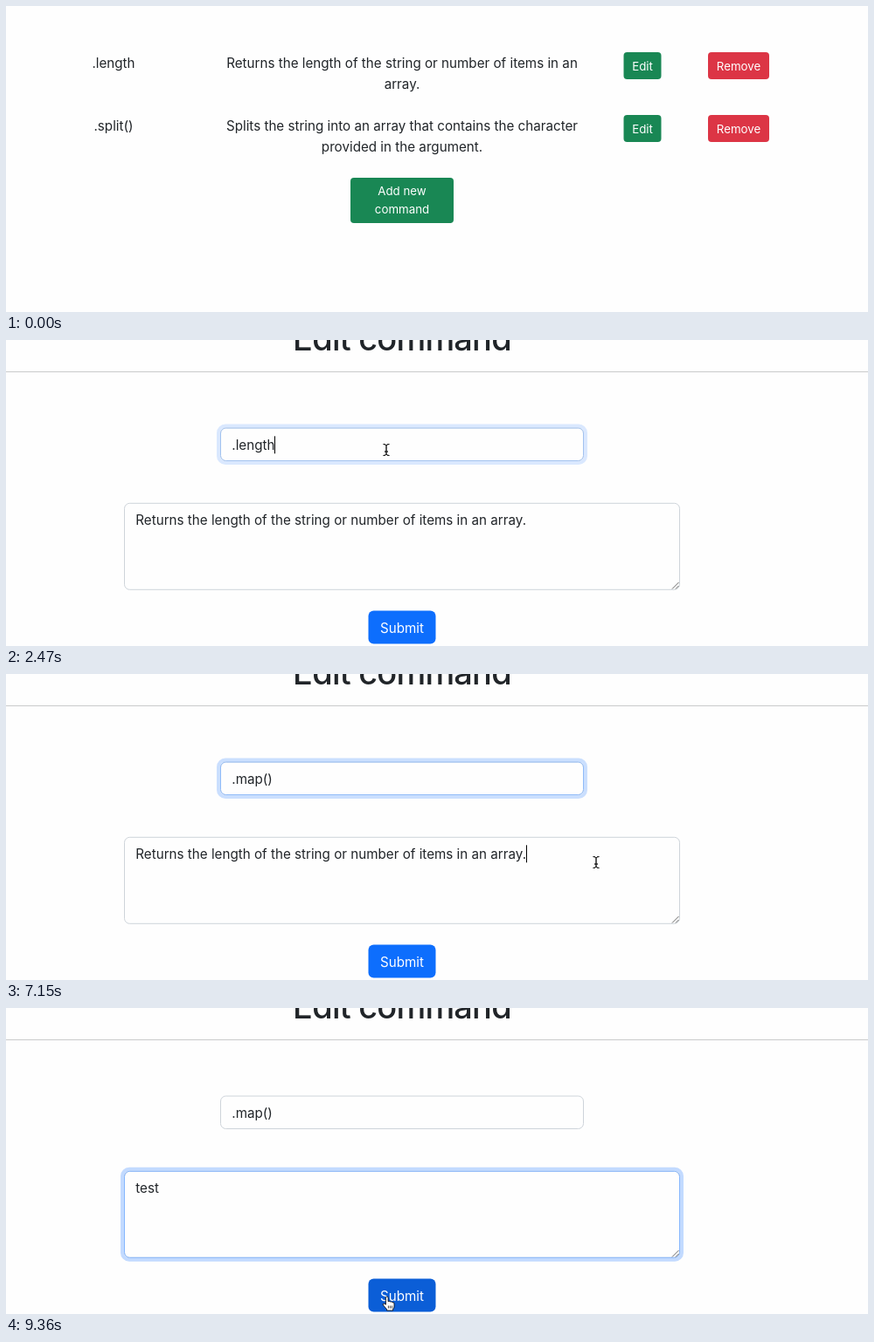
Animation, 986 px wide and 351 px high, one loop 9490 ms. Source, as an HTML page:

```html
<!DOCTYPE html>
<html lang="en">
<head>
<meta charset="utf-8">
<title>Edit command</title>
<style>
  html, body { margin: 0; width: 100%; height: 100%; overflow: hidden; background: #fefefe; }
  svg { display: block; width: 986px; height: 351px; }
  text { font: 15.2px Inter, "Open Sans", sans-serif; font-optical-sizing: none; fill: #212529; white-space: pre; }
  .mid { text-anchor: middle; }
  .small { font-size: 13.3px; }
  .light { fill: #fff; }
  .title { font-size: 38px; font-weight: 500; letter-spacing: -.8px; }
  .field { fill: #fefefe; stroke: #ced4da; }
  .halo { fill: none; stroke: #0d6efd; stroke-opacity: .25; stroke-width: 4; }
  .ring { fill: none; stroke: #86b7fe; }
  .selection { fill: #b4d5fc; }
</style>
</head>
<body>
<svg id="stage" viewBox="0 0 986 351">
  <g id="list"></g>
  <g id="form">
    <text class="mid title" x="453" y="11.5">Edit command</text>
    <path d="M0 36.5H986" stroke="#c9cacb"/>
  </g>
  <g id="pointer">
    <g id="arrow">
      <path d="M1 2V15L4 12.3L6.2 17L8.6 16L6.5 11.3H10.5Z" fill="#000" opacity=".15"/>
      <path d="M0 0V13L3 10.2L5.2 15L7.4 14L5.3 9.4H9.4Z" fill="#000" stroke="#fff" stroke-width=".9"/>
    </g>
    <g id="beam" fill="none" stroke-linecap="round">
      <path id="beamShape" d="M-3 -6.5Q-.3 -6.5 0 -5Q.3 -6.5 3 -6.5M0 -5V5M-3 6.5Q-.3 6.5 0 5Q.3 6.5 3 6.5M-1.5 2H1.5" stroke="#fff" stroke-width="2.4"/>
      <use href="#beamShape" id="beamInk"/>
    </g>
    <g id="hand">
      <path d="M-1.6 7V.6Q-1.6 -1 -.2 -1Q1.1 -1 1.1 .6V4.6Q2.3 3.8 3.4 5Q4.7 4.3 5.7 5.6Q8 5 8 7.2V10Q8 12 6.6 13.4V15H-.4V13.6L-4.4 9Q-5.4 7.6 -4.2 7Q-3.2 6.6 -1.6 8.2Z" fill="#fff" stroke="#111" stroke-width=".9"/>
      <path d="M1.4 9.5V12.5M3.4 9.5V12.5M5.4 9.5V12.5" stroke="#111" stroke-width=".8"/>
    </g>
  </g>
</svg>
<script>
const LOOP = 9490, TICK = 130;
const $ = id => document.getElementById(id);

function add(parent, tag, attrs, content = '') {
  const node = document.createElementNS('http://www.w3.org/2000/svg', tag);
  for (const key in attrs) node.setAttribute(key, attrs[key]);
  node.textContent = content;
  return parent.appendChild(node);
}
const setAttrs = (node, attrs) => { for (const k in attrs) node.setAttribute(k, attrs[k]); };
const show = (node, on) => node.style.display = on ? '' : 'none';
const label = (parent, x, y, content, cls = 'mid') => add(parent, 'text', { x, y, class: cls }, content);

function button(parent, x, y, width, height, rx, color, hover, lines, baseline, cls) {
  const rect = add(parent, 'rect', { x, y, width, height, rx, fill: color });
  lines.forEach((line, i) => label(parent, x + width / 2, baseline + i * 21, line, 'mid light ' + cls));
  return { rect, x, y, width, height, color, hover, parent };
}

function field(x, y, width, height, textY) {
  const box = { x, y, width, height, rx: 6 };
  add($('form'), 'rect', { ...box, class: 'field' });
  const focus = add($('form'), 'g', {});
  add(focus, 'rect', { x: x - 2.5, y: y - 2.5, width: width + 5, height: height + 5, rx: 8, class: 'halo' });
  add(focus, 'rect', { ...box, class: 'ring' });
  const selection = add($('form'), 'rect', { y: textY - 18, height: 24.5, class: 'selection' });
  const text = label($('form'), x + 12.8, textY, '', '');
  const caret = add($('form'), 'rect', { y: textY - 15.5, width: 1, height: 20, fill: '#000' });
  return { x, y, width, height, focus, selection, text, caret };
}

// List page
const list = $('list'), green = ['#198754', '#157347'], red = ['#dc3545', '#bb2d3b'];
const rows = [
  ['.length', 'Returns the length of the string or number of items in an', 'array.'],
  ['.split()', 'Splits the string into an array that contains the character', 'provided in the argument.']
];
const buttons = [];
rows.forEach(([name, first, second], i) => {
  const y = 71 + i * 72;
  label(list, 123, y, name);
  label(list, 453, y, first);
  label(list, 453, y + 24, second);
  buttons.push(button(list, 706.5, y - 18, 43, 31, 4, ...green, ['Edit'], y + 2.7, 'small'));
  buttons.push(button(list, 803, y - 18, 70, 31, 4, ...red, ['Remove'], y + 2.7, 'small'));
});
buttons.push(button(list, 394, 197, 118, 52, 4, ...green, ['Add new', 'command'], 217.3, 'small'));

// Form page
const form = $('form');
const nameField = field(245.5, 101, 415, 37.5, 125.8);
const noteField = field(135.5, 187.3, 635, 99, 211.8);
add(form, 'path', { d: 'M762 285.5L769.5 278M766 285.5L769.5 282', stroke: '#666', 'stroke-width': 1 });
buttons.push(button(form, 414.5, 310.5, 77, 38, 6, '#0d6efd', '#0b5ed7', ['Submit'], 335.6, ''));
setAttrs($('beamInk'), { stroke: '#222' });
$('beamInk').style.strokeWidth = 1;
$('beamShape').removeAttribute('stroke');
$('beamShape').removeAttribute('stroke-width');
setAttrs($('beam'), { stroke: '#222', 'stroke-width': 1 });

// Timeline: [ms, value...]
const FORM_OPENS = 1170, NOTE_FOCUS = 7150;
const pointerPath = [
  [130, 114, 312], [910, 720, 75], [1170, 720, 75], [2080, 435, 126], [3640, 435, 126],
  [3900, 264, 116], [6240, 264, 116], [7020, 675, 216], [7540, 675, 216], [7670, 400, 214],
  [7800, 60, 316], [7930, 42, 324], [8190, 84, 325], [8450, 380, 338], [8840, 380, 338], [9230, 436, 332]
];
const nameSteps = [[0, '.length'], [4420, '.m'], [4680, '.map'], [5850, '.map('], [5980, '.map()']];
const noteSteps = [[0, 'Returns the length of the string or number of items in an array.'],
  [7930, 't'], [8060, 'tes'], [8190, 'test']];
const nameSelect = [[0, -1], [2990, 1], [4420, -1]];
const noteSelect = [[0, -1], [7670, 36], [7800, 0], [7930, -1]];
const caretSteps = [[0, 0], [2470, 1], [2990, 0], [4420, 1], [5200, 0], [5850, 1], [6500, 0],
  [7020, 1], [7670, 0], [7930, 1], [8710, 0]];
const nameFocus = [[0, 0], [2470, .6], [2600, 1], [7150, .85], [7280, .1], [7410, 0]];
const noteFocus = [[0, 0], [7280, .85], [7410, 1]];

const at = (steps, t) => steps.filter(step => step[0] <= t).pop()[1];

function pointerAt(t) {
  const next = pointerPath.findIndex(p => p[0] > t);
  if (next < 0) return pointerPath[pointerPath.length - 1].slice(1);
  const [t0, x0, y0] = pointerPath[next - 1], [t1, x1, y1] = pointerPath[next];
  const k = (t - t0) / (t1 - t0), e = k * k * (3 - 2 * k);
  return [x0 + (x1 - x0) * e, y0 + (y1 - y0) * e];
}

function drawField(f, content, from, focus, caretOn) {
  if (f.text.textContent !== content) f.text.textContent = content;
  const left = f.x + 12.8, end = left + f.text.getComputedTextLength();
  f.focus.style.opacity = focus;
  show(f.selection, from >= 0);
  if (from >= 0) {
    const start = left + (from ? f.text.getSubStringLength(0, from) : 0);
    setAttrs(f.selection, { x: start, width: end - start });
  }
  show(f.caret, caretOn);
  f.caret.setAttribute('x', Math.round(end));
}

function drawPointer(t, page) {
  show($('pointer'), t >= 130);
  if (t < 130) return;
  const [x, y] = pointerAt(t);
  const inside = r => x >= r.x && x <= r.x + r.width && y >= r.y && y <= r.y + r.height;
  let kind = page === form && [nameField, noteField].some(inside) ? 'beam' : 'arrow';
  for (const b of buttons) {
    const over = b.parent === page && inside(b);
    b.rect.setAttribute('fill', over ? b.hover : b.color);
    if (over) kind = 'hand';
  }
  for (const id of ['arrow', 'beam', 'hand']) show($(id), id === kind);
  $('pointer').setAttribute('transform', `translate(${x} ${y})`);
}

function render(time) {
  const t = Math.floor(time % LOOP / TICK) * TICK;
  const page = t < FORM_OPENS ? list : form;
  show(list, page === list);
  show(form, page === form);
  if (t < 130) buttons.forEach(b => b.rect.setAttribute('fill', b.color));
  if (page === form) {
    const caret = at(caretSteps, t), inNote = t >= NOTE_FOCUS;
    drawField(nameField, at(nameSteps, t), at(nameSelect, t), at(nameFocus, t), caret && !inNote);
    drawField(noteField, at(noteSteps, t), at(noteSelect, t), at(noteFocus, t), caret && inNote);
  }
  drawPointer(t, page);
}

const began = performance.now();
function tick() {
  render(performance.now() - began);
  requestAnimationFrame(tick);
}
tick();
</script>
</body>
</html>
```
